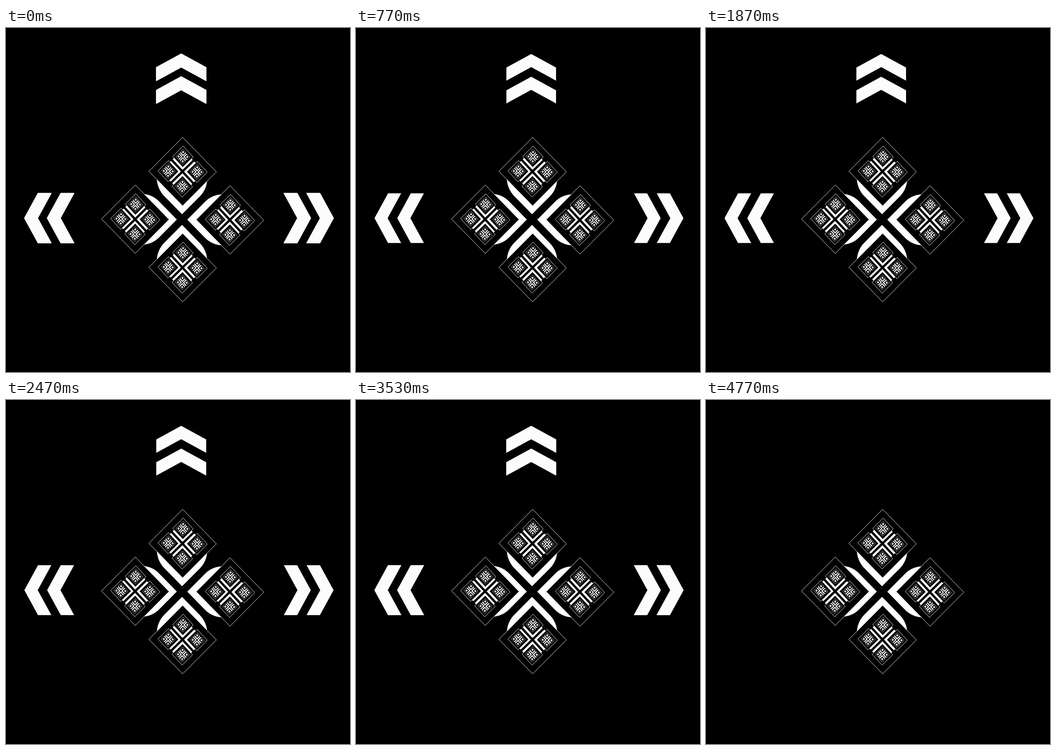
Recreate the animation shown at these times as an HTML page with a canvas. Size 748 by 748 pixels, loop 5.01 s.

```html
<!DOCTYPE html>
<html>
<head>
<meta charset="utf-8">
<style>
  html, body { margin: 0; height: 100%; overflow: hidden; background: #000; }
  canvas { display: block; }
</style>
</head>
<body>
<canvas id="stage" width="748" height="748"></canvas>
<script>
const ctx = document.getElementById('stage').getContext('2d');
const LOOP = 5010, CYCLE = 33, VISIBLE = 21;
const SHRINK = 0.304, REACH = 103.5, TIP = 11.4;
const rad = deg => deg * Math.PI / 180;

function polygon(points) {
  ctx.beginPath();
  points.forEach(([x, y]) => ctx.lineTo(x, y));
  ctx.closePath();
}

function diamond(y, half) {
  polygon([[0, y - half], [half, y], [0, y + half], [-half, y]]);
}

// White petal pointing at the centre: a drop at the top level, a square below it
function petal(level) {
  if (level) {
    diamond(-TIP - 72, 72);
  } else {
    const r = 55;
    ctx.beginPath();
    ctx.moveTo(0, -TIP);
    ctx.arc(0, -TIP - r * Math.SQRT2, r, rad(135), rad(45));
    ctx.closePath();
  }
  ctx.fillStyle = '#fff';
  ctx.fill();
}

function plus(length, width) {
  ctx.fillStyle = '#fff';
  ctx.fillRect(-length / 2, -width / 2, length, width);
  ctx.fillRect(-width / 2, -length / 2, width, length);
}

function ornament(level, scale) {
  if (level === 3) return plus(5 / scale, 1.6 / scale);
  const half = level < 2 ? 73.8 : 64;
  for (let side = 0; side < 4; side++) {
    const turn = rad(90 * side);
    ctx.save();
    ctx.translate(-1.3, 0);
    ctx.rotate(turn);
    petal(level);
    ctx.restore();

    ctx.save();
    ctx.rotate(turn);
    diamond(-REACH, half);
    ctx.fillStyle = '#000';
    ctx.fill();
    ctx.strokeStyle = '#fff';
    ctx.lineWidth = (level < 2 ? 0.9 : 0.6) / scale;
    ctx.stroke();
    ctx.translate(0, -REACH);
    ctx.rotate(rad(1.2) - turn);
    ctx.scale(SHRINK, SHRINK * 1.02);
    ornament(level + 1, scale * SHRINK);
    ctx.restore();
  }
}

function arrows(x, y, angle, grow) {
  ctx.save();
  ctx.translate(x, y);
  ctx.rotate(rad(angle));
  ctx.fillStyle = ctx.strokeStyle = '#fcfcfc';
  ctx.lineWidth = grow;
  ctx.lineJoin = 'round';
  for (const top of [-54, -4.5]) {
    polygon([[0, top], [54, top + 29.5], [54, top + 58],
             [0, top + 28.5], [-54, top + 58], [-54, top + 29.5]]);
    ctx.fill();
    if (grow > 0.01) ctx.stroke();
  }
  ctx.restore();
}

function draw(now) {
  const step = Math.floor((now % LOOP + 5) * 0.03);
  const phase = (step + 10) % CYCLE;
  ctx.fillStyle = '#000';
  ctx.fillRect(0, 0, 748, 748);

  ctx.save();
  ctx.transform(0.995, 0.0075, 0, 1.009, 384.1, 416.6);
  ornament(0, 1);
  ctx.restore();

  if (phase < VISIBLE) {
    const grow = 1.8 * Math.sin(Math.PI * phase / (VISIBLE - 1));
    arrows(381, 110.4, 0, grow);
    arrows(94.2, 413.4, -90, grow);
    arrows(658, 413.4, 90, grow);
  }
}

const start = performance.now();
function tick() {
  draw(performance.now() - start);
  requestAnimationFrame(tick);
}
tick();
</script>
</body>
</html>
```
